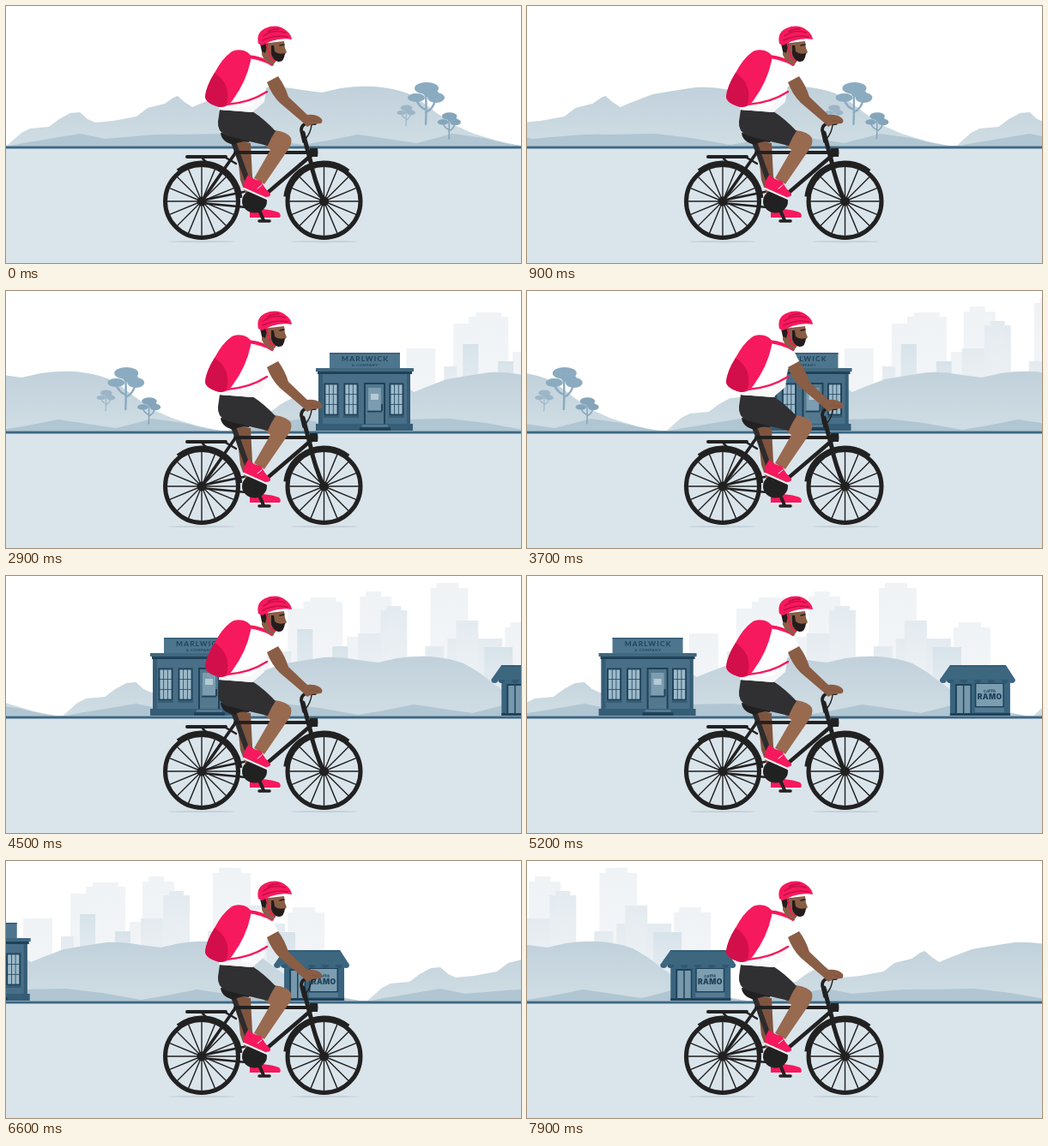
An HTML page with a canvas that plays this animation: 600 by 300 pixels, repeating every 8000 ms.

```html
<!DOCTYPE html>
<html lang="en">
<head>
<meta charset="utf-8">
<title>City ride</title>
<style>
html, body { margin: 0; width: 100%; height: 100%; overflow: hidden; background: #fff; }
canvas { display: block; width: 600px; height: 300px; }
</style>
</head>
<body>
<canvas id="stage" width="600" height="300"></canvas>
<script>
const c = document.getElementById('stage').getContext('2d');
const LOOP = 8000, STEP = 100, SPEED = 120.6, RANGE = 608;
const RED = '#f7195d', DEEP = '#d20f4b', BLACK = '#222121';
const ARM = '#8a5d45', LEG = '#986a50', FAR_LEG = '#7f543f';
const WALL = '#486f87', TRIM = '#365d76', INK = '#1f4259', GLASS = '#9dbaca';

function rect(x, y, w, h, fill) {
  c.fillStyle = fill;
  c.fillRect(x, y, w, h);
}
function shape(d, fill) {
  c.fillStyle = fill;
  c.fill(new Path2D(d));
}
function line(d, color, width, cap = 'round') {
  c.strokeStyle = color;
  c.lineWidth = width;
  c.lineCap = cap;
  c.lineJoin = 'round';
  c.stroke(new Path2D(d));
}
function oval(x, y, rx, ry, fill) {
  c.beginPath();
  c.ellipse(x, y, rx, ry, 0, 0, Math.PI * 2);
  c.fillStyle = fill;
  c.fill();
}
function arc(r, from, to, width) {
  c.beginPath();
  c.arc(0, 0, r, from * Math.PI / 180, to * Math.PI / 180);
  c.strokeStyle = BLACK;
  c.lineWidth = width;
  c.stroke();
}
function at(x, y, draw) {
  c.save();
  c.translate(x, y);
  draw();
  c.restore();
}
function label(text, x, y, font, spacing) {
  c.font = font;
  c.letterSpacing = spacing + 'px';
  c.textAlign = 'center';
  c.fillStyle = INK;
  c.fillText(text, x + spacing / 2, y);
  c.letterSpacing = '0px';
}
function fade(y0, y1, a, b) {
  const g = c.createLinearGradient(0, y0, 0, y1);
  g.addColorStop(0, a);
  g.addColorStop(1, b);
  return g;
}

// left, right, top, shade
const blocks = [
  [816, 850, 67, 0], [871, 890, 38, 0], [889, 935, 30, 0], [897, 927, 25, 0],
  [955, 992, 24, 0], [962, 980, 18, 0], [1037, 1081, 14, 0], [1044, 1070, 8, 0],
  [1124, 1167, 60, 0], [1130, 1156, 54, 0], [940, 957, 71, 0],
  [860, 875, 88, 1], [882, 900, 62, 2], [923, 941, 82, 2], [953, 980, 67, 1],
  [979, 1010, 40, 1], [986, 1003, 35, 1], [1031, 1053, 82, 1],
  [1057, 1121, 73, 1], [1067, 1093, 52, 1], [1100, 1133, 83, 2]
];
function city() {
  const tones = ['#f0f3f6', '#e4ebf0', '#d7e3ea'];
  for (const [l, r, top, shade] of blocks)
    rect(l, top, r - l, 164 - top, fade(top, 190, tones[shade], '#f5f7f9'));
}

const peaks = 'M0 164L18 148L28 143L50 141L62 132L75 125L86 124L95 132L104 136L125 134L152 129L165 119L185 114L195 107L200 105L208 112L217 118L229 113L255 103L285 98L305 95Q325 94 345 98L368 101L390 96Q410 93 430 94Q452 96 468 102L485 112L502 125L522 139L545 149L575 158L604 164Z';
const hills = 'M0 164L20 160L45 156L86 149L115 155L150 152Q178 149 205 150L258 149L300 154L345 162L375 157L410 150L444 155L478 160L502 154L520 149L556 154L586 161L608 164Z';
function mountains(shift) {
  for (let x = -(shift % RANGE); x < 600; x += RANGE) {
    at(x, 0, () => {
      shape(peaks, fade(95, 164, '#c1d1db', '#d0dde4'));
      shape(hills, '#b0c6d2');
    });
  }
}

function tree(x, y, s, color) {
  at(x, y, () => {
    c.scale(s, s);
    line('M0 0Q1 -16 0 -40M0 -17Q-8 -20 -11 -29M0 -14Q9 -18 11 -28', color, 2.4);
    oval(1, -42, 14, 7, color);
    oval(-11, -31, 10, 5, color);
    oval(12, -31, 10, 6, color);
    oval(6, -36, 9, 5, color);
  });
}
function trees() {
  tree(466, 140, .5, '#9cb6c7');
  tree(489, 138, 1, '#8babc0');
  tree(516, 155, .63, '#84a5bb');
}

function pane(x, y, w, h, cols, rows) {
  rect(x - 1.5, y - 1.5, w + 3, h + 3, INK);
  const cw = w / cols, rh = h / rows;
  for (let i = 0; i < cols; i++)
    for (let j = 0; j < rows; j++)
      rect(x + i * cw + .4, y + j * rh + .4, cw - .8, rh - .8, GLASS);
}
function store() {
  rect(17, 72, 82, 19, '#4d768e');
  rect(17, 72, 82, 1.5, TRIM);
  label('MARLWICK', 58, 82.3, 'bold 8.4px Lato, sans-serif', 1.2);
  label('& COMPANY', 58, 88, 'bold 4.2px Lato, sans-serif', .6);
  rect(4, 95, 107, 68.5, WALL);
  rect(1, 90, 114, 4, '#41687f');
  rect(3, 94, 110, 3, INK);
  rect(4, 97, 5, 58, TRIM);
  rect(107, 97, 4, 58, TRIM);
  for (const x of [12, 35, 88]) {
    pane(x, 109, 14, 35, 3, 3);
    rect(x - 2, 146, 18, 2, TRIM);
  }
  rect(57, 107, 25, 49, INK);
  rect(59, 109, 21, 47, '#54798f');
  rect(62, 113, 15, 26, '#7c9db0');
  rect(65, 120, 9, 7, '#b4cad6');
  rect(61, 140, 17, 1.5, INK);
  rect(77, 132, 2, 8, INK);
  rect(1, 155, 113, 8.5, TRIM);
  rect(55, 156, 30, 3, '#55798f');
  rect(52, 159, 36, 4.5, INK);
}
function cafe() {
  rect(12, 121, 70, 42.5, '#3a647e');
  shape('M12 104H77L88 121H0Z', '#3d667f');
  rect(12, 104, 65, 2, TRIM);
  for (let i = 0; i < 11; i++) {
    c.beginPath();
    c.arc(4 + i * 8, 121, 4, 0, Math.PI);
    c.fillStyle = i % 2 ? '#2f5873' : '#3b6580';
    c.fill();
  }
  rect(18, 126, 19, 37.5, INK);
  rect(20, 128, 7, 32, '#7899ac');
  rect(28.5, 128, 7, 32, '#7899ac');
  rect(41, 125, 34, 28, INK);
  rect(42.5, 126, 31, 26, '#7d9eb1');
  label('caffè', 58, 136, 'bold 6px Lato, sans-serif', .2);
  label('RAMO', 58, 144, '900 8.6px Inter, sans-serif', .3);
  rect(41, 154, 34, 5, '#557a92');
  rect(12, 160, 70, 3.5, INK);
}

function wheel(x, y, guardFrom, guardTo) {
  at(x, y, () => {
    c.lineCap = 'butt';
    c.strokeStyle = BLACK;
    c.lineWidth = 1.4;
    c.beginPath();
    for (let i = 0; i < 16; i++) {
      const a = i * Math.PI / 8;
      c.moveTo(0, 0);
      c.lineTo(41 * Math.cos(a), 41 * Math.sin(a));
    }
    c.stroke();
    arc(42.5, 0, 360, 5);
    arc(45.5, guardFrom, guardTo, 4);
    oval(0, 0, 5.5, 5.5, BLACK);
  });
}

function bike() {
  oval(228, 275, 39, 1.2, '#c7d1d8');
  oval(371, 275, 39, 1.2, '#c7d1d8');
  // far leg
  shape('M268 157L285 160L287 199L299 238L287 242L273 203Z', FAR_LEG);
  shape('M284 238Q291 241 298 237Q311 238 318 241Q321 244 319 247H284Z', RED);
  line('M285 248H319', '#f4f4f6', 1.5);
  wheel(228, 228, -128, -5);
  wheel(370.5, 228, -173, -51);
  line('M211 176H256', BLACK, 4);
  line('M229 178L236 185M256 177L268 184', BLACK, 2.5);
  line('M228 228L269 169', BLACK, 3.6);
  line('M228 227L277 217M228 230L280 235', BLACK, 2.6);
  line('M264 156L290 228', '#2d2c2d', 6);
  line('M267 171H354', BLACK, 4);
  line('M293 228L356 174', BLACK, 4.5);
  line('M346 148L355 182Q359 203 370 228', BLACK, 5);
  line('M360 137H350Q344 139 344 145L347 158', BLACK, 3.8);
  line('M349 155Q355 148 356 139', BLACK, 1.5);
  shape('M354 166H363Q364 171 363 176H354Z', BLACK);
  shape('M250 148Q264 149 285 155L283 159Q272 157 266 162Q251 159 250 148Z', BLACK);
  oval(289.5, 228, 14.5, 13.5, BLACK);
  line('M291 229L300 250', BLACK, 4);
  line('M295 251H307', BLACK, 3.5);
}

function rider() {
  // near leg
  shape('M300 148L313 145Q328 147 332 154Q334 161 327 170L301 208L289 201L308 168L298 160Z', LEG);
  shape('M282 197Q288 203 297 204Q301 213 308 219Q309 223 302 223L277 212Q276 206 282 197Z', RED);
  line('M277 213L304 225', '#f4f4f6', 2);
  line('M293 213L298 209', '#fff', 1);
  shape('M249 121L287 123Q301 132 314 146Q309 153 305 163L279 157L256 151Q246 146 247 135Z', '#302f31');
  // torso
  shape('M279 57L300 57Q309 64 317 82L304 91Q303 105 287 124L248 121Q249 96 263 73Z', '#fff');
  shape('M256 116L286 117L303 98L301 112L287 124L248 121Z', '#f7f8f9');
  line('M282 59Q299 61 310 68', RED, 4);
  line('M257 115Q284 113 304 100', RED, 2.6);
  // backpack
  shape('M262 54Q267 50 277 52Q287 55 285 64Q280 88 264 110Q258 119 249 118Q233 114 232 106Q233 94 243 78Q252 61 262 54Z', RED);
  shape('M243 78Q263 91 257 115Q254 118 249 118Q233 114 232 106Q233 94 243 78Z', DEEP);
  // arm
  shape('M304 89L317 82Q325 93 329 106L351 127Q361 126 367 131Q370 134 367 137L357 138L351 141L346 136L319 113Q309 103 304 89Z', ARM);
  line('M355 133L365 135', FAR_LEG, 1);
  // head
  shape('M298 44L324 41L325 49L327 54L324 57Q323 65 315 64L311 69Q301 65 298 57Z', ARM);
  shape('M309 46L312 46L313 53Q317 57 325 55Q324 66 317 65Q311 63 309 56Z', '#241d1c');
  line('M319 46L324 45', '#241d1c', 1.3);
  shape('M296 44L305 44L302 55L298 53Z', '#241d1c');
  line('M303 43L308 61L313 64', RED, 1.8);
  shape('M294 44Q291 31 302 26Q316 20 327 29Q332 33 333 39Q321 37 309 41L298 46Z', RED);
  line('M300 35Q311 27 325 31M299 40Q314 33 328 36M305 30Q313 26 318 27', '#c20d45', 1.4);
}

function draw(ms) {
  const shift = SPEED * ms / 1000;
  rect(0, 0, 600, 300, '#fff');
  at(-shift, 0, city);
  mountains(shift);
  at(-shift, 0, trees);
  at(709.7 - shift, 0, store);
  at(1108 - shift, 0, cafe);
  rect(0, 163, 600, 137, '#dae4eb');
  rect(0, 163.5, 600, 3, '#3c6782');
  bike();
  rider();
}

function tick(now) {
  draw(Math.floor((now % LOOP) / STEP) * STEP);
  requestAnimationFrame(tick);
}
draw(0);
requestAnimationFrame(tick);
</script>
</body>
</html>
```
